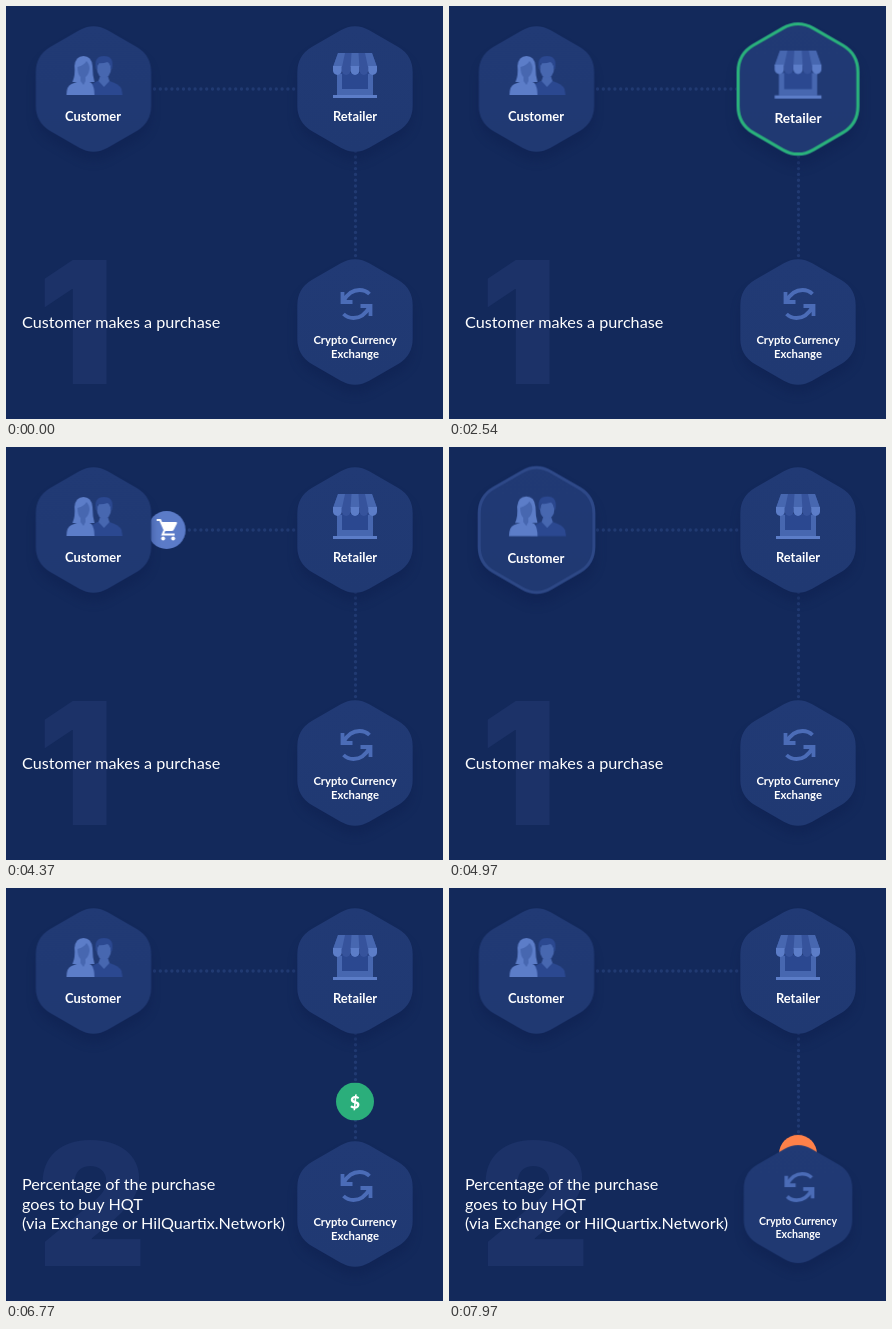
These frames come from a looping animation (437 by 413 pixels, 8 s). An HTML page:

```html
<!DOCTYPE html>
<html lang="en">
<head>
<meta charset="utf-8">
<title>Purchase flow</title>
<style>
  html, body { margin: 0; width: 100%; height: 100%; overflow: hidden; background: #13295b; }
  svg { display: block; width: 437px; height: 413px; font-family: Lato, sans-serif; fill: #fff; }

  .node, .ring, .token, .step { animation: 8s linear infinite; }

  .hex { fill: url(#face); filter: drop-shadow(0 9px 5px rgba(13, 31, 77, .4)); }
  .ring { fill: none; stroke: #2ab27b; stroke-width: 3; opacity: 0; }
  .label { font-weight: 700; font-size: 12.9px; text-anchor: middle; }
  .small { font-size: 11.3px; }
  .copy { font-size: 16.2px; }
  .digit { font: 900 171px Inter, sans-serif; fill: #1c3268; text-anchor: middle; }
  .dots { fill: none; stroke: #213a72; stroke-width: 3.4; stroke-linecap: round; stroke-dasharray: 0 5.8; }

  .light { fill: #5c7dc8; }
  .mid { fill: #4767b0; }
  .dark { fill: #2b4890; }
  .shade { fill: #36539c; }

  #customer { animation-name: customer; }
  #retailer { animation-name: retailer; }
  #exchange { animation-name: exchange; }
  #customer .ring { animation-name: customer-ring; stroke: #5b7bc8; }
  #retailer .ring { animation-name: retailer-ring; }
  #exchange .ring { animation-name: exchange-ring; }
  #coin { animation-name: coin; }
  #cart { animation-name: cart; }
  #reward { animation-name: reward; }
  #step1 { animation-name: fade-out; }
  #step2 { animation-name: fade-in; }

  /* A node swells as a token arrives and dips as one leaves. */
  @keyframes customer {
    0%, 6.25% { transform: scale(1); }
    8.125% { transform: scale(.9); animation-timing-function: ease-out; }
    11.25% { transform: scale(1); }
    57.5% { transform: scale(1); animation-timing-function: ease-in; }
    60.625% { transform: scale(1.1); }
    62.5%, 100% { transform: scale(1); }
  }
  @keyframes retailer {
    0% { transform: scale(1); }
    29.375% { transform: scale(1); animation-timing-function: ease-in; }
    32.5% { transform: scale(1.1); }
    34.375% { transform: scale(1); }
    36.25% { transform: scale(.9); animation-timing-function: ease-out; }
    39.375%, 68.875% { transform: scale(1); }
    70.75% { transform: scale(.9); animation-timing-function: ease-out; }
    73.875%, 100% { transform: scale(1); }
  }
  @keyframes exchange {
    0% { transform: scale(1); }
    92% { transform: scale(1); animation-timing-function: ease-in; }
    95.125% { transform: scale(1.1); }
    97% { transform: scale(1); }
    98.875% { transform: scale(.9); }
    100% { transform: scale(.96); }
  }
  @keyframes customer-ring {
    0%, 57.5%, 62.5%, 100% { opacity: 0; }
    59.5%, 61% { opacity: 1; }
  }
  @keyframes retailer-ring {
    0%, 29.375%, 34.375%, 100% { opacity: 0; }
    31.4%, 32.9% { opacity: 1; }
  }
  @keyframes exchange-ring {
    0%, 92%, 97%, 100% { opacity: 0; }
    94%, 95.5% { opacity: 1; }
  }

  /* Tokens rest hidden behind the nodes between trips. */
  @keyframes coin {
    0%, 6.25% { transform: translate(87.5px, 83px); }
    34.375%, 68.875% { transform: translate(349px, 83px); }
    97%, 100% { transform: translate(349px, 316px); }
  }
  @keyframes cart {
    0%, 34.375% { transform: translate(349px, 83px); }
    62.5%, 100% { transform: translate(87.5px, 83px); }
  }
  @keyframes reward {
    0%, 97% { transform: translate(349px, 316px); }
    100% { transform: translate(349px, 259px); }
  }
  @keyframes fade-out {
    0%, 62.625% { opacity: 1; }
    65.125%, 100% { opacity: 0; }
  }
  @keyframes fade-in {
    0%, 62.625% { opacity: 0; }
    65.125%, 100% { opacity: 1; }
  }
</style>
</head>
<body>
<svg viewBox="0 0 437 413">
  <defs>
    <linearGradient id="face" x2="0" y2="1">
      <stop stop-color="#213a75"/>
      <stop offset="1" stop-color="#203972"/>
    </linearGradient>
    <path id="hex" d="M-14.7-58.5Q0-67 14.7-58.5L43.3-42Q57.7-33.5 57.7-16.5V16.5Q57.7 33.5 43.3 42L14.7 58.5Q0 67-14.7 58.5L-43.3 42Q-57.7 33.5-57.7 16.5V-16.5Q-57.7-33.5-43.3-42Z"/>
    <path id="arrow" d="M13-10Q9-14 3-14-7-14-13-3M-14-12V-2H-4" fill="none" stroke="#4b6cb7" stroke-width="3.800"/>
    <path id="scallop" d="M-4.4-23H4.4V-18.500A4.400 4.400 0 0 1-4.400-18.500Z"/>
  </defs>

  <path class="dots" d="M142.700 83H302M349.500 139.400V258"/>

  <g id="step1" class="step">
    <text class="digit" x="70" y="378">1</text>
    <text class="copy" x="16" y="322">Customer makes a purchase</text>
  </g>
  <g id="step2" class="step">
    <text class="digit" x="86" y="378">2</text>
    <text class="copy">
      <tspan x="16" y="302">Percentage of the purchase</tspan>
      <tspan x="16" y="322">goes to buy HQT</tspan>
      <tspan x="16" y="341">(via Exchange or HilQuartix.Network)</tspan>
    </text>
  </g>

  <g id="coin" class="token">
    <circle r="19" fill="#2bae7b"/>
    <text y="6" font-size="17" font-weight="900" text-anchor="middle">$</text>
  </g>
  <g id="cart" class="token">
    <circle r="19" fill="#5b7bc8"/>
    <path d="M-10-10H-6.500L-2 0-4 4.500H8" fill="none" stroke="#fff" stroke-width="2"/>
    <path d="M-6-8H9.500Q11-8 10.300-6.500L7 0Q6.500 1 5 1H-2Z"/>
    <circle cx="-3.500" cy="8.500" r="2"/>
    <circle cx="6.500" cy="8.500" r="2"/>
  </g>
  <circle id="reward" class="token" r="19" fill="#ff8149"/>

  <g transform="translate(87.5 83)">
    <g id="customer" class="node">
      <use href="#hex" class="hex"/>
      <path class="dark" d="M-6 6V0Q-3-5 4-8H16Q26-5 28 0L29 6Z"/>
      <path class="mid" d="M5-8 10.500-2 16-8 14-14H7Z"/>
      <ellipse class="mid" cx="10.500" cy="-20" rx="7" ry="9"/>
      <path class="dark" d="M2.500-20Q0-33 10.500-33 21-33 18.500-20H17.500Q17-26 14-27 8-25 4.500-26L3.500-20Z"/>
      <path class="light" d="M-21-7Q-18-14-19-23-18-33-10-33-2-33-1-23-1-14 1-7Z"/>
      <path class="light" d="M-27 6Q-27-3-22-5L-14-8H-6L-2-6Q1-2 1 6Z"/>
      <path class="mid" d="M-16-22Q-9-24-7-28-4-25-4-20-5-14-8-12V-8L-10-4-13-8V-12Q-16-15-16-22Z"/>
      <use href="#hex" class="ring" transform="scale(.975)"/>
      <text class="label" x="-.5" y="32">Customer</text>
    </g>
  </g>

  <g transform="translate(349 83)">
    <g id="retailer" class="node">
      <use href="#hex" class="hex"/>
      <path class="dark" d="M-17-16H17V6H-17Z"/>
      <path class="mid" d="M-18-15H-13V6H-18ZM13-15H18V6H13ZM-13 0H13V6H-13Z"/>
      <path class="light" d="M-22 6H22V9H-22Z"/>
      <path class="shade" d="M-17-36H17L22-22H-22Z"/>
      <path class="mid" d="M-17-36H-10L-13-22H-22ZM-3.500-36H3.500L4.400-22H-4.400ZM10-36H17L22-22H13Z"/>
      <use href="#scallop" class="light" x="-17.600"/>
      <use href="#scallop" class="shade" x="-8.800"/>
      <use href="#scallop" class="light"/>
      <use href="#scallop" class="shade" x="8.800"/>
      <use href="#scallop" class="light" x="17.600"/>
      <use href="#hex" class="ring" transform="scale(.975)"/>
      <text class="label" y="32">Retailer</text>
    </g>
  </g>

  <g transform="translate(349 316)">
    <g id="exchange" class="node">
      <use href="#hex" class="hex"/>
      <g transform="translate(1.500 -18)">
        <use href="#arrow"/>
        <use href="#arrow" transform="rotate(180)"/>
      </g>
      <use href="#hex" class="ring" transform="scale(.975)"/>
      <text class="label small" y="22">Crypto Currency</text>
      <text class="label small" y="36">Exchange</text>
    </g>
  </g>
</svg>
</body>
</html>
```
